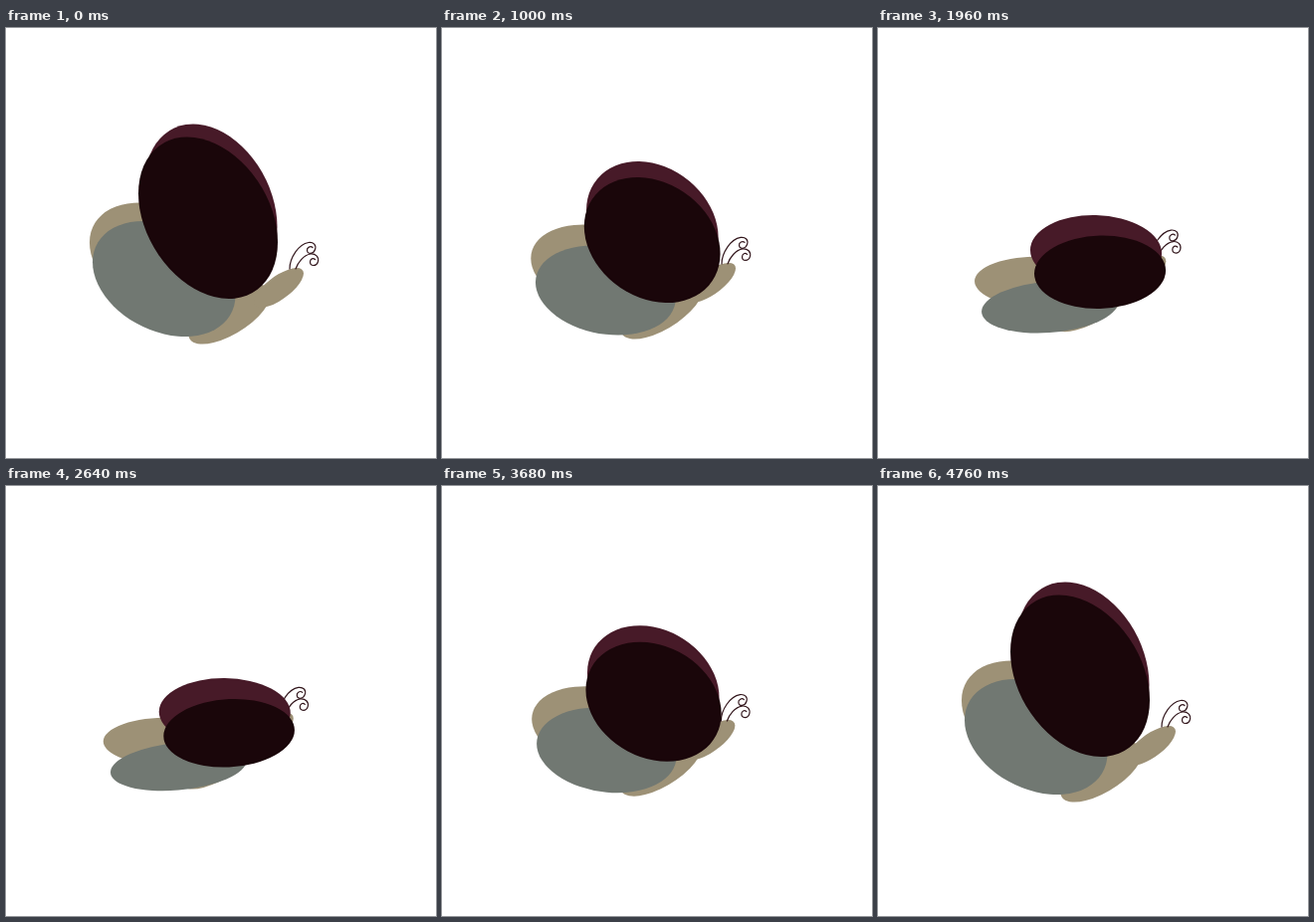
These frames come from a looping animation (432x432 px, 4.8 s). An HTML page with a canvas:

```html
<!DOCTYPE html>
<html>
<head>
<meta charset="utf-8">
<style>
html, body { margin: 0; height: 100%; overflow: hidden; background: #fff; }
canvas { display: block; }
</style>
</head>
<body>
<canvas id="stage" width="432" height="432"></canvas>
<script>
const ctx = document.getElementById('stage').getContext('2d');
const PERIOD = 4800, LEAD = 10;
const TAN = '#9d9176', GREY = '#717872', MAROON = '#471a28', DARK = '#1a060a';

// Ellipse: centre x, centre y, half width, half height, height of the rightmost point below centre.
// Each wing has an open and a folded pose.
const wings = {
  hindFar:  [TAN,    [155.7, 233.5, 71.75, 58, 18],     [166.3, 257.6, 68.2, 23.6, 0]],
  foreFar:  [MAROON, [206, 177.75, 66.5, 81.25, 22],    [220.1, 228.7, 66, 33, 0]],
  hindNear: [GREY,   [158.75, 252, 71.75, 58, 16.8],    [173.65, 282.6, 68.2, 23.6, -6.4]],
  foreNear: [DARK,   [203, 190.75, 70, 81.25, 24.4],    [224.7, 249.8, 65.7, 33, -3.7]]
};
const thorax = [224.5, 287.5, 41.3, 30.1, -19.7];
const head = [274, 261, 25, 20, -14.4];
const antennae = [
  'M285 242C285 231 294 217 304 215.5C309 215 312 218 310.5 222.5C309 227 303 228 302.5 223.5C302 220.5 306 218.5 308 220.5',
  'M291 242C293 236 299 228 306 227C311 226.5 314.5 230 313.5 234.5C312 240 305.5 239.5 305.5 235C305.5 232 308.5 230.5 310.5 232.5'
].map(d => new Path2D(d));

function ellipse(color, [x, y, w, h, skew]) {
  ctx.save();
  ctx.transform(w, skew, 0, Math.sqrt(h * h - skew * skew), x, y);
  ctx.beginPath();
  ctx.arc(0, 0, 1, 0, 2 * Math.PI);
  ctx.restore();
  ctx.fillStyle = color;
  ctx.fill();
}

function wing([color, open, folded], fold) {
  ellipse(color, open.map((v, i) => v + (folded[i] - v) * fold));
}

function body(fold) {
  ctx.save();
  ctx.translate(-10.5 * fold, -13.5 * fold);
  ellipse(TAN, thorax);
  ellipse(TAN, head);
  ctx.strokeStyle = '#32161c';
  ctx.lineWidth = 1.2;
  ctx.lineCap = 'round';
  antennae.forEach(path => ctx.stroke(path));
  ctx.restore();
}

function draw(now) {
  const fold = (1 - Math.cos(2 * Math.PI * (now + LEAD) / PERIOD)) / 2;
  ctx.clearRect(0, 0, 432, 432);
  wing(wings.hindFar, fold);
  body(fold);
  wing(wings.foreFar, fold);
  wing(wings.hindNear, fold);
  wing(wings.foreNear, fold);
}

const start = performance.now();
function tick() {
  draw(performance.now() - start);
  requestAnimationFrame(tick);
}
tick();
</script>
</body>
</html>
```
